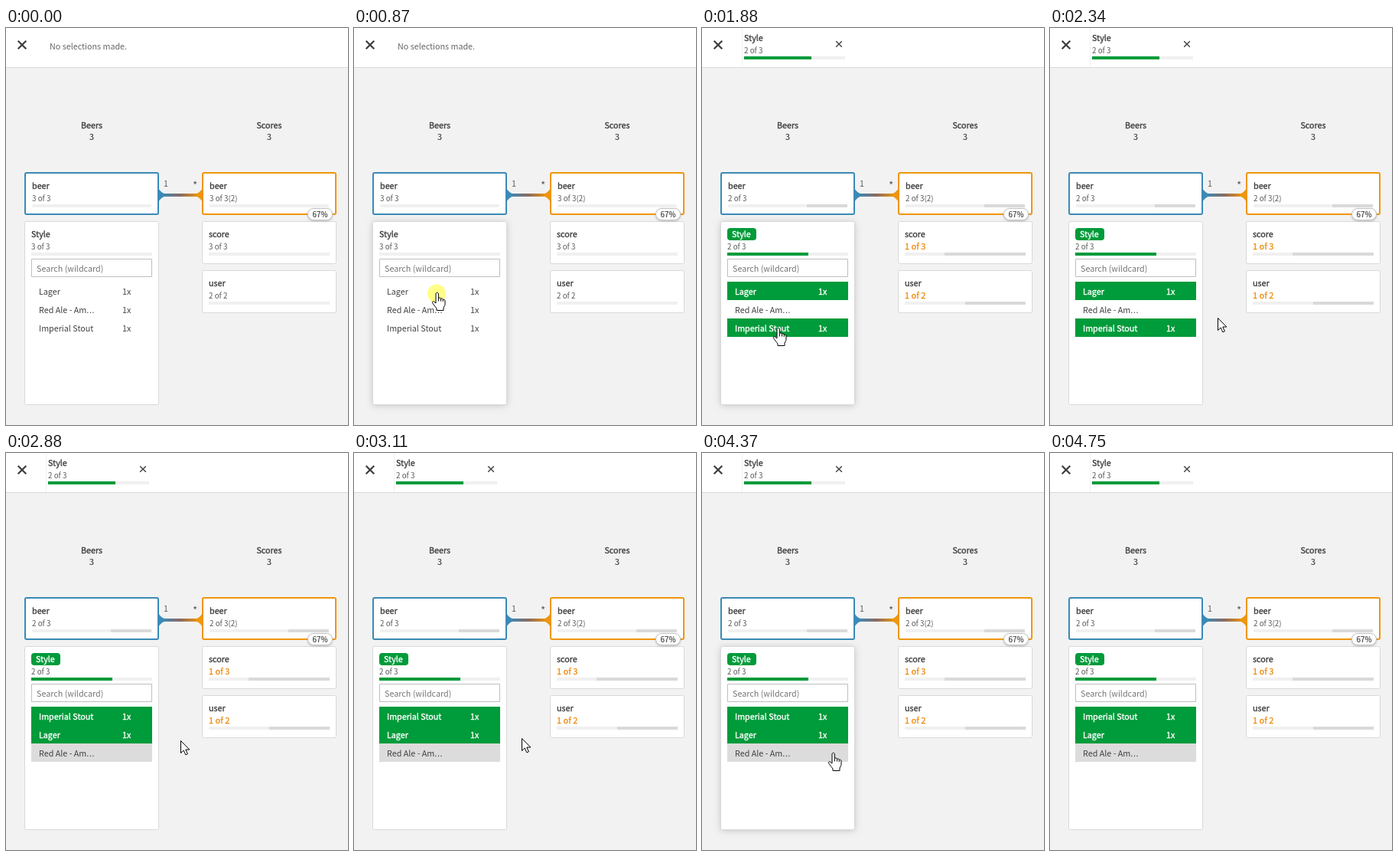
Recreate the animation shown at these times as an HTML page with a canvas. Size 447 by 518 pixels, loop 5230 ms.

```html
<!DOCTYPE html>
<html lang="en">
<head>
<meta charset="utf-8">
<title>Associations</title>
<style>
html, body { margin: 0; width: 100%; height: 100%; overflow: hidden; background: #f2f2f2; }
canvas { display: block; }
</style>
</head>
<body>
<canvas id="stage" width="447" height="518"></canvas>
<script>
const ctx = document.getElementById('stage').getContext('2d');
const LOOP = 5230;
const FONT = '"Noto Sans CJK JP", "Noto Sans CJK SC", "Noto Sans CJK KR", "Noto Sans", sans-serif';
const FONT_SCALE = 0.895; // the Latin glyphs of this family are drawn large for their em
const INK = '#404040', GREY = '#666', BLUE = '#3a8ab7', ORANGE = '#ef960c',
  GREEN = '#009b3a', LIGHT = '#f0f0f0', DARK = '#d9d9d9';

const SELECT_1 = 1020, SELECT_2 = 1790, REORDER = 2800;
const CLICKS = [[870, SELECT_1], [1560, 1880]];

// Pointer moves: start, end, number of steps, destination
const START = [276, 519];
const MOVES = [
  [70, 560, 8, 108, 346],
  [1100, 1330, 4, 103, 396],
  [1560, 1560, 1, 99, 392],
  [2040, 2340, 5, 219, 378],
  [2420, 2500, 2, 243, 380],
  [2650, 3110, 7, 219, 372],
  [3760, 3910, 3, 172, 391],
  [4370, 4370, 1, 171, 392],
  [4450, 4750, 5, 352, 525]
];

const ARROW = new Path2D('M.5 .5V16.5L4.2 13L6.8 18.8L9.4 17.7L6.8 12H11.8Z');
const HAND = new Path2D('M5 2C5-.2 8.4-.2 8.4 2V7.5C9 6.6 11.3 6.8 11.5 8.3C12.5 7.5 14 8 14.2 9.4' +
  'C15.5 8.8 17 9.6 17 11V15C17 17.5 15.5 18.5 15 20V23.5H6V21C4.5 19 2 16 .8 14' +
  'C-.5 12 1.5 11 3 12.3L5 14Z');
const KNUCKLES = new Path2D('M8.4 7.5V11.5M11.5 8.3V11.5M14.2 9.4V12');

const mix = (a, b, u) => a + (b - a) * u;
const settle = (t, at) => t < at ? 0 : t < at + 85 ? 0.6 : 1;

function rect(x, y, w, h, color) {
  ctx.fillStyle = color;
  ctx.fillRect(x, y, w, h);
}

function box(x, y, w, h, r, fill, stroke, lineWidth = 1) {
  ctx.beginPath();
  ctx.roundRect(x, y, w, h, r);
  ctx.fillStyle = fill;
  ctx.fill();
  ctx.shadowColor = 'transparent';
  if (!stroke) return;
  ctx.strokeStyle = stroke;
  ctx.lineWidth = lineWidth;
  ctx.stroke();
}

function shadow(blur, alpha) {
  ctx.shadowColor = `rgba(0,0,0,${alpha})`;
  ctx.shadowBlur = blur;
  ctx.shadowOffsetY = 1;
}

function text(str, x, y, color = INK, { size = 12, bold = 0, align = 'left' } = {}) {
  ctx.font = `${size * FONT_SCALE}px ${FONT}`;
  ctx.textAlign = align;
  ctx.fillStyle = ctx.strokeStyle = color;
  ctx.fillText(str, x, y);
  if (!bold) return;
  ctx.lineWidth = bold;
  ctx.lineJoin = 'round';
  ctx.strokeText(str, x, y);
}

const title = (str, x, y, color, align) => text(str, x, y, color, { bold: 0.35, align });
const count = (str, x, y, hot) => hot
  ? text(str, x, y, '#ee8500', { size: 12.3, bold: 0.25 })
  : text(str, x, y, '#595959', { size: 11 });

function cross(x, y, r, lineWidth) {
  ctx.beginPath();
  ctx.moveTo(x - r, y - r);
  ctx.lineTo(x + r, y + r);
  ctx.moveTo(x + r, y - r);
  ctx.lineTo(x - r, y + r);
  ctx.strokeStyle = INK;
  ctx.lineWidth = lineWidth;
  ctx.stroke();
}

function bar(x, y, w, part, on, off) {
  rect(x, y, w, 4, off);
  rect(x, y, Math.round(w * part), 4, on);
}

// Bar fraction as it goes through the three selection states
function level(t, states) {
  const first = mix(states[0], states[1], settle(t, SELECT_1));
  return mix(first, states[2], settle(t, SELECT_2));
}

function card(t, x, y, name, counts, total, suffix = '', accent) {
  const state = (t >= SELECT_1) + (t >= SELECT_2);
  const n = counts[state], inset = accent ? 10 : 9;
  const shares = counts.map(c => Math.floor(100 * c / total) / 100);
  ctx.globalAlpha = n ? 1 : 0.45;
  if (accent) box(x + 1, y + 1, 174, 54, 2, '#fff', accent, 2);
  else box(x + 0.5, y + 0.5, 175, 55, 2, '#fff', DARK);
  const dy = accent ? 1 : 0;
  title(name, x + inset, y + 21 + dy);
  count(`${n} of ${total}${suffix}`, x + inset, y + 37 + dy, n && n / total <= 0.5);
  bar(x + inset, y + 41 + dy, 176 - 2 * inset, level(t, shares), LIGHT, DARK);
  ctx.globalAlpha = 1;
}

function header(picked, part) {
  rect(0, 0, 447, 51, '#fff');
  rect(0, 51, 447, 1, DARK);
  cross(21, 22, 5.3, 2.3);
  if (!picked) return text('No selections made.', 57, 28, GREY);
  rect(52, 0, 1, 51, LIGHT);
  title('Style', 55, 17);
  count(`${picked} of 3`, 55, 33);
  bar(55, 37, 132, part, GREEN, LIGHT);
  cross(179, 21, 3.8, 1.4);
}

function link() {
  const fade = ctx.createLinearGradient(204, 0, 252, 0);
  fade.addColorStop(0, BLUE);
  fade.addColorStop(0.5, '#8a6a62');
  fade.addColorStop(1, ORANGE);
  rect(204, 216, 48, 4, fade);
  for (const [x, side, color] of [[199, 1, BLUE], [257, -1, ORANGE]]) {
    ctx.beginPath();
    ctx.moveTo(x, 209);
    ctx.quadraticCurveTo(x + 4 * side, 215, x + 8 * side, 216);
    ctx.lineTo(x + 8 * side, 220);
    ctx.quadraticCurveTo(x + 4 * side, 221, x, 227);
    ctx.fillStyle = color;
    ctx.fill();
  }
  text('1', 206, 207, '#595959');
  text('*', 244, 210, '#595959', { size: 15 });
}

function stylePanel(t, picked, part, hover) {
  if (hover) shadow(8, 0.2);
  box(24.5, 252.5, 175, 239, 2, '#fff', DARK);
  if (picked) {
    box(33, 261, 38, 16, 4, GREEN);
    title('Style', 39, 273, '#fff');
  } else title('Style', 33, 273);
  count(`${picked || 3} of 3`, 33, 289);
  bar(33, 293, 158, part, GREEN, LIGHT);
  box(33.5, 301.5, 157, 23, 0, '#fff', '#bfbfbf');
  text('Search (wildcard)', 40, 318, '#737373');

  const lager = 'Lager', ale = 'Red Ale - Am.\u200a.\u200a.', stout = 'Imperial Stout';
  const sorted = t >= REORDER;
  const chosen = [lager, stout].slice(0, picked);
  (sorted ? [stout, lager, ale] : [lager, ale, stout]).forEach((name, i) => {
    const y = 331 + 24 * i, on = chosen.includes(name);
    if (on) rect(33, y, 158, 24, GREEN);
    else if (sorted) rect(33, y, 158, 24, '#dcdcdc');
    const put = on ? title : text, color = on ? '#fff' : INK;
    put(name, 43, y + 17, color);
    if (on || !picked) put('1x', 152, y + 17, color);
  });
}

function pointerAt(t) {
  let [x, y] = START;
  for (const [t0, t1, n, tx, ty] of MOVES) {
    if (t < t0) break;
    const step = Math.min(n, 1 + Math.floor((t - t0) / (t1 - t0 || 1) * (n - 1) + 0.15));
    const u = step / n, eased = u * u * (3 - 2 * u);
    x = mix(x, tx, eased);
    y = mix(y, ty, eased);
  }
  return [Math.round(x), Math.round(y)];
}

function pointer(t, x, y) {
  if (CLICKS.some(([from, to]) => t >= from && t < to)) {
    ctx.beginPath();
    ctx.arc(x, y + 0.5, 12, 0, 7);
    ctx.fillStyle = 'rgba(255,255,0,.47)';
    ctx.fill();
  }
  const hand = x > 33 && x < 191 && y > 331 && y < 403;
  const shape = hand ? HAND : ARROW;
  ctx.save();
  ctx.translate(hand ? x - 6 : x, hand ? y - 1 : y);
  ctx.fillStyle = '#fff';
  ctx.strokeStyle = '#000';
  ctx.lineWidth = 1;
  ctx.fill(shape);
  ctx.stroke(shape);
  if (hand) ctx.stroke(KNUCKLES);
  ctx.restore();
}

function draw(t) {
  const picked = (t >= SELECT_1) + (t >= SELECT_2);
  const part = level(t, [0, 0.34, 0.67]);
  const [px, py] = pointerAt(t);
  rect(0, 0, 447, 518, '#f2f2f2');
  header(picked, part);
  for (const [name, x] of [['Beers', 112], ['Scores', 344]]) {
    title(name, x, 131, INK, 'center');
    text('3', x, 146, INK, { bold: 0.2, align: 'center' });
  }
  card(t, 24, 188, 'beer', [3, 1, 2], 3, '', BLUE);
  card(t, 256, 188, 'beer', [3, 1, 2], 3, '(2)', ORANGE);
  card(t, 256, 252, 'score', [3, 0, 1], 3);
  card(t, 256, 316, 'user', [2, 0, 1], 2);
  link();
  shadow(3, 0.3);
  box(394.5, 235.5, 32, 15, 7.5, '#fff', '#c4c4c4');
  text('67%', 410.5, 247, INK, { size: 11, bold: 0.2, align: 'center' });
  stylePanel(t, picked, part, px >= 24 && px < 200 && py >= 252 && py < 492);
  pointer(t, px, py);
}

const begin = performance.now();
function tick() {
  draw((performance.now() - begin) % LOOP);
  requestAnimationFrame(tick);
}
tick();
</script>
</body>
</html>
```
